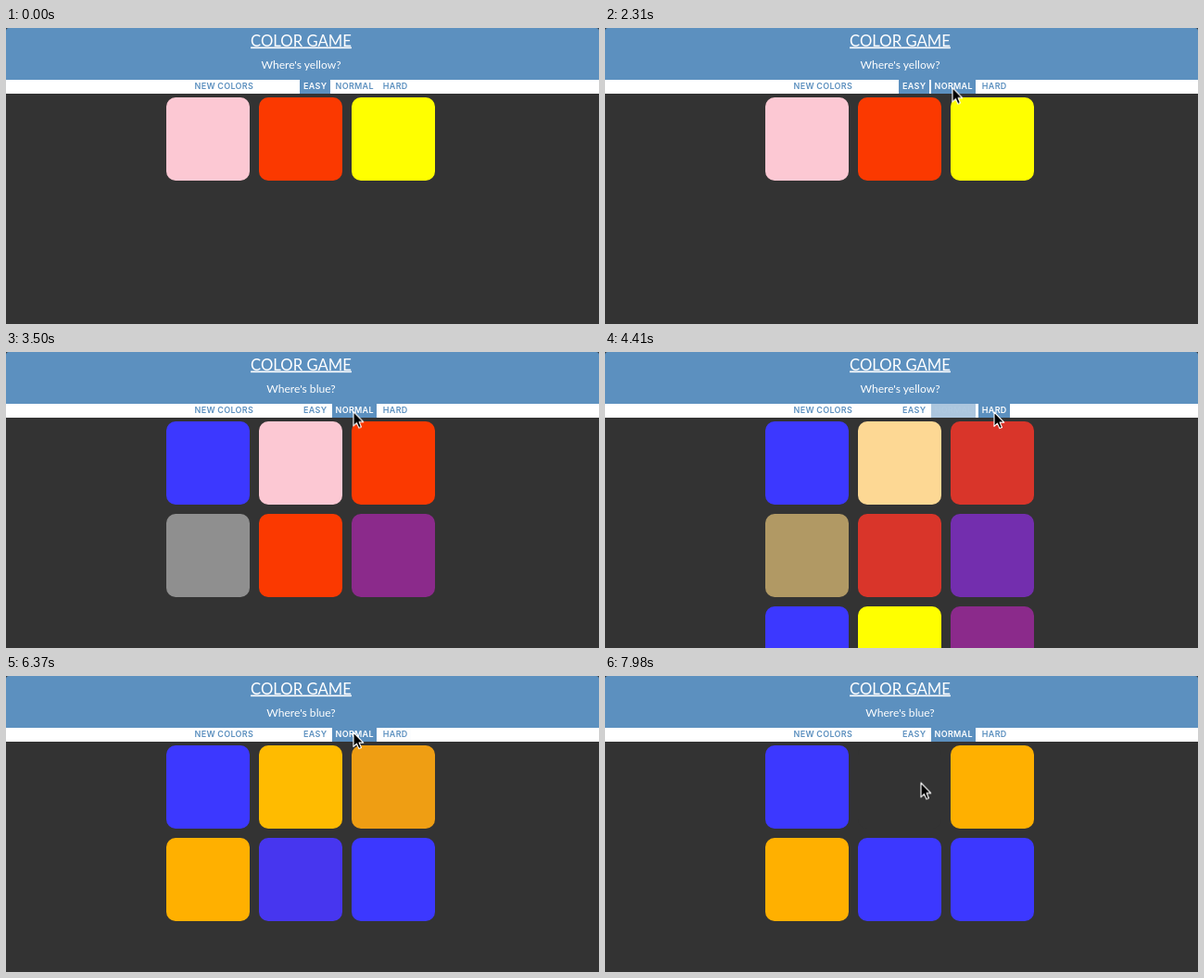
Write an HTML page that moves like this. It is 640 by 320 pixels and loops after 8000 ms.

```html
<!DOCTYPE html>
<html lang="en">
<head>
<meta charset="utf-8">
<title>Color Game</title>
<style>
  html, body { margin: 0; width: 100%; height: 100%; overflow: hidden; background: #333; }
  svg { display: block; width: 640px; height: 320px; }
  text { text-anchor: middle; }
  .head { font-family: Lato, sans-serif; fill: #fff; }
  .title { font-size: 16.7px; text-decoration: underline; text-decoration-thickness: 1px; }
  .prompt { font-size: 12.1px; }
  .nav { font: 600 9px Inter, sans-serif; letter-spacing: .27px; fill: #5c90bf; }
</style>
</head>
<body>
<svg viewBox="0 0 640 320">
  <rect width="640" height="320" fill="#333"/>
  <path d="M0 56V3Q0 0 3 0H637Q640 0 640 3V56Z" fill="#5c90bf"/>
  <rect y="56" width="640" height="15" fill="#fff"/>
  <text class="head title" x="318.5" y="19.5">COLOR GAME</text>
  <text class="head prompt" id="yellow" x="318.5" y="44">Where's yellow?</text>
  <text class="head prompt" id="blue" x="318.5" y="44">Where's blue?</text>
  <text class="nav" x="235.3" y="66">NEW COLORS</text>
  <g id="buttons"></g>
  <g id="squares"></g>
  <path id="cursor" d="M0 0V15.4L3.5 12.1 5.9 17.6 8.5 16.5 6.1 11.1H10.8Z"
        fill="#000" stroke="#fff" stroke-width="1.1" stroke-linejoin="round"/>
</svg>
<script>
const LOOP = 8000, TO_NORMAL = 2575, TO_HARD = 4310, BACK = 6085, GUESS = 7570;
const FADE = 500, BUTTON_FADE = 350;
const C = {
  blue: '#3c38ff', pink: '#fcc8d3', red: '#fb3900', yellow: '#ffff00', gray: '#8f8f8f',
  purple: '#8b2a8b', orange: '#ffb000', steel: '#5c90bf', white: '#ffffff', page: '#333333'
};
const $ = id => document.getElementById(id);

function add(parent, tag, attrs, label = '') {
  const el = document.createElementNS('http://www.w3.org/2000/svg', tag);
  for (const key in attrs) el.setAttribute(key, attrs[key]);
  el.textContent = label;
  return parent.appendChild(el);
}

function loop(el, frames) {
  el.animate(frames, { duration: LOOP, iterations: Infinity });
}

// Holds each value until the next change, then eases to it over `fade` ms.
function track(el, prop, start, changes, fade = 0) {
  let value = start;
  const frames = [{ offset: 0, [prop]: value }];
  for (const [time, next] of changes) {
    frames.push({ offset: time / LOOP, [prop]: value, easing: 'ease' });
    value = next;
    frames.push({ offset: Math.min(1, (time + fade) / LOOP), [prop]: value });
  }
  frames.push({ offset: 1, [prop]: value });
  loop(el, frames);
}

track($('yellow'), 'opacity', 1, [[TO_NORMAL, 0], [TO_HARD, 1], [BACK, 0]]);
track($('blue'), 'opacity', 0, [[TO_NORMAL, 1], [TO_HARD, 0], [BACK, 1]]);

// Label, left edge, width, lit at start, times at which the state flips.
const buttons = [
  ['EASY', 317, 33, true, [TO_NORMAL]],
  ['NORMAL', 352, 48, false, [1700, TO_HARD, 5330]],
  ['HARD', 403, 34, false, [3980, BACK]]
];
for (const [label, x, width, lit, flips] of buttons) {
  const box = add($('buttons'), 'rect', { x, y: 56, width, height: 15 });
  const text = add($('buttons'), 'text', { class: 'nav', x: x + width / 2 + .2, y: 66 }, label);
  const paint = (el, on, off) => track(el, 'fill', lit ? on : off,
    flips.map((time, i) => [time, (i % 2 === 0) !== lit ? on : off]), BUTTON_FADE);
  paint(box, C.steel, C.white);
  paint(text, C.white, C.steel);
}

const boards = [
  ['pink', 'red', 'yellow'],
  ['blue', 'pink', 'red', 'gray', 'red', 'purple'],
  ['blue', 'yellow', 'purple', 'orange', 'purple', 'blue', 'blue', 'yellow', 'purple'],
  ['blue', 'orange', 'orange', 'orange', 'blue', 'blue']
];
const boardTimes = [0, TO_NORMAL, TO_HARD, BACK];
for (let i = 0; i < 9; i++) {
  const square = add($('squares'), 'rect', {
    x: 173 + i % 3 * 100, y: 75 + Math.floor(i / 3) * 100, width: 90, height: 90, rx: 10
  });
  const first = boards.findIndex(board => board[i]);
  const changes = [];
  for (let b = first + 1; b < boards.length; b++) {
    if (boards[b][i]) changes.push([boardTimes[b], C[boards[b][i]]]);
  }
  if (i === 1) changes.push([GUESS, C.page]);
  track(square, 'fill', C[boards[first][i]], changes, FADE);
  if (i >= 6) track(square, 'opacity', 0, [[TO_HARD, 1], [BACK, 0]]);
  else if (i >= 3) track(square, 'opacity', 0, [[TO_NORMAL, 1]]);
}

const path = [
  [0, 240, 283], [980, 240, 283], [1330, 345.5, 164.5], [1750, 374, 66], [1900, 375, 64.5],
  [3780, 375, 64.5], [4130, 420, 65], [5180, 420, 65], [5460, 379, 61.5], [5700, 379, 61.5],
  [5950, 375, 61], [6930, 375, 61], [7430, 341, 115.5], [8000, 341, 115.5]
];
loop($('cursor'), path.map(([time, x, y]) => ({
  offset: time / LOOP, transform: `translate(${x}px, ${y}px)`,
  easing: time === 980 ? 'linear' : 'ease-in-out'
})));
track($('cursor'), 'opacity', 0, [[980, 1]]);
</script>
</body>
</html>
```
